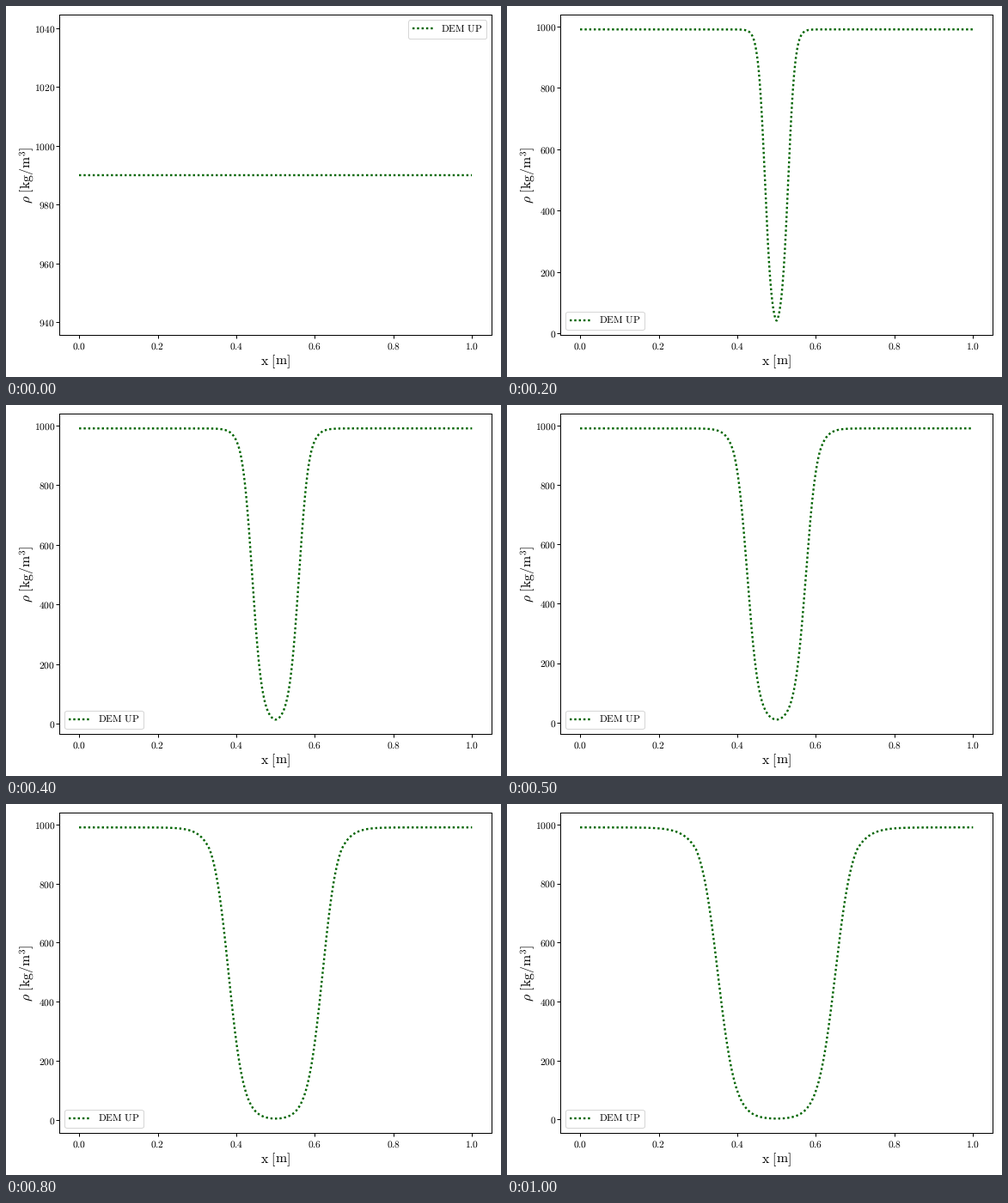
Animation of 576 by 432 pixels, one loop 1.1 s. Source, as a matplotlib script:

```python
import numpy as np
import matplotlib.pyplot as plt
from matplotlib.animation import FuncAnimation

W, H, DPI = 576, 432, 72
STEPS, INTERVAL = 11, 100
RHO = 990.1          # undisturbed mixture density
EDGE_SPEED = 0.015   # metres travelled by each cavity edge per step
KNEE = 2.5           # logit level where the upper shoulder starts

plt.rcParams.update({
    "font.family": "Liberation Serif",
    "mathtext.fontset": "cm",
    "text.hinting": "none",
    "text.hinting_factor": 1,
    "axes.labelsize": 15.8,
    "axes.linewidth": 1,
})


def roman(text):
    return r"$\mathrm{" + text.replace(" ", r"\ ") + "}$"


def density(x, k):
    """Cavity opening symmetrically around x = 0.5 after k steps."""
    if k == 0:
        return np.full_like(x, RHO)
    low = 109 * k ** -(1.3 + 0.13 * np.log(k))
    floor = np.log(low / (RHO - low))
    edge = EDGE_SPEED * k - 0.0005
    bend = 0.0012 * k + 0.0001 * k ** 2
    scale = (np.hypot(edge, bend) - bend) / -floor
    level = floor + (np.hypot(x - 0.5, bend) - bend) / scale
    # the shoulder flattens as the wave spreads
    slope = 1.2 - 0.2 * np.log(k)
    level = np.where(level > KNEE, KNEE + (level - KNEE) * slope, level)
    return RHO / (1 + np.exp(-level))


def limits(rho):
    lo, hi = rho.min(), rho.max()
    if hi - lo < 1e-6:
        lo, hi = 0.95 * lo, 1.05 * hi
    pad = 0.05 * (hi - lo)
    return lo - pad, hi + pad


fig, ax = plt.subplots(figsize=(W / DPI, H / DPI), dpi=DPI)
fig.subplots_adjust(left=62.2 / W, right=565.2 / W,
                    bottom=48.7 / H, top=421.7 / H)

x = np.linspace(0, 1, 1001)
line, = ax.plot(x, density(x, 0), ls=(0, (1, 1.2)), color="darkgreen",
                lw=2.41, label=roman("DEM UP"))
ax.set_xlim(-0.05, 1.05)
ax.set_xlabel(roman("x [m]"), labelpad=1.5)
ax.set_ylabel(r"$\rho\ \mathrm{[kg/m^3]}$", labelpad=-2.3)
ax.tick_params(labelsize=11.5, length=4, width=1)
ax.tick_params(axis="x", pad=3)
ax.tick_params(axis="y", pad=1)
ax.xaxis.set_major_formatter(lambda v, _: roman(f"{v:.1f}"))
ax.yaxis.set_major_formatter(lambda v, _: roman(f"{v:.0f}"))

legend = ax.legend(loc="upper right", fontsize=12)
legend.get_texts()[0].set_fontsize(11.5)


def update(k):
    rho = density(x, k)
    line.set_ydata(rho)
    ax.set_ylim(*limits(rho))
    legend.set_loc("lower left" if k else "upper right")
    return line, legend


anim = FuncAnimation(fig, update, frames=STEPS, interval=INTERVAL,
                     init_func=lambda: update(0), repeat=True, repeat_delay=0)
plt.show()
```
